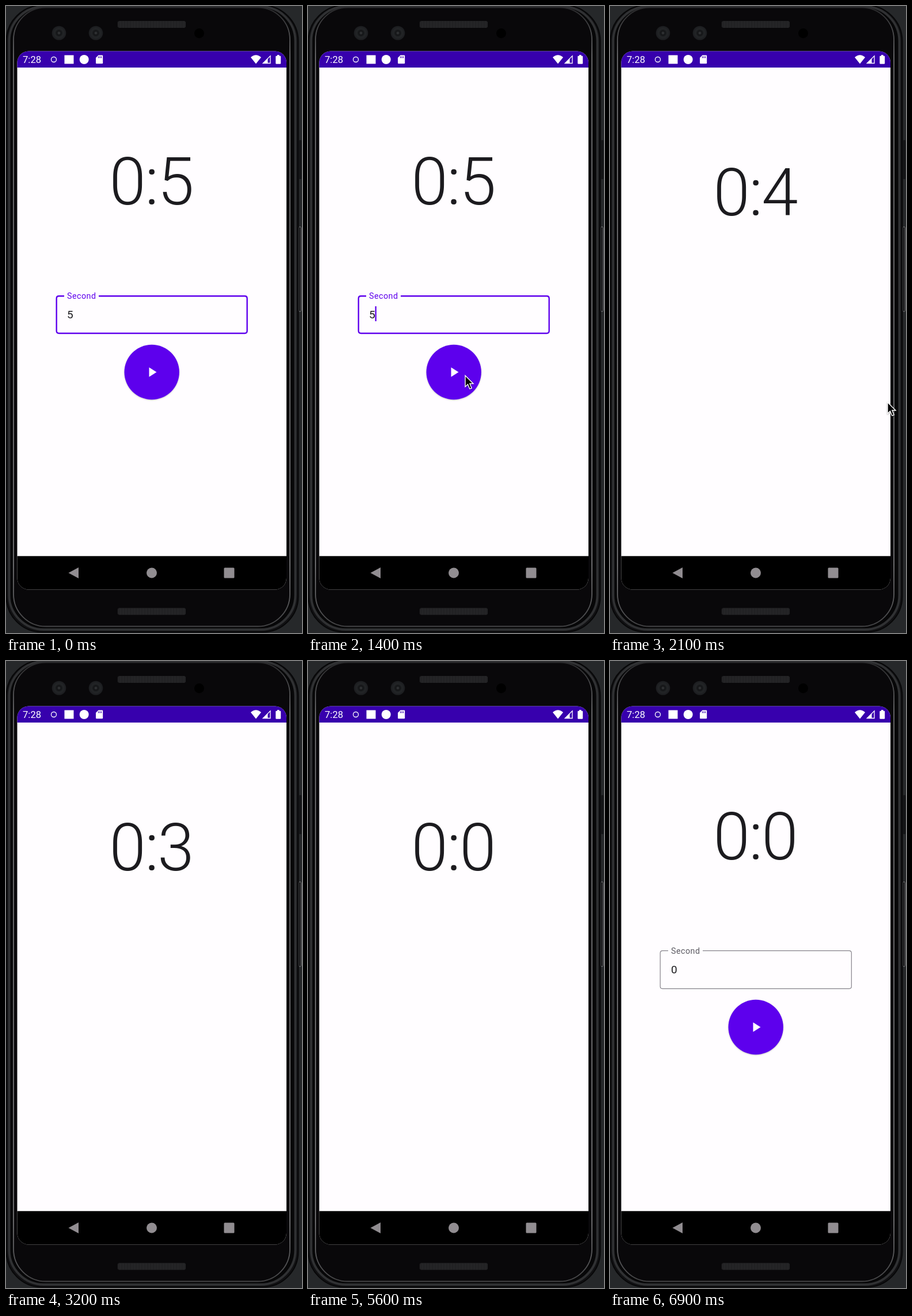
An HTML page for the animation above (7600 ms loop, 514 by 1090 pixels).

```html
<!DOCTYPE html>
<html lang="en">
<head>
<meta charset="utf-8">
<title>Countdown timer</title>
<style>
  html, body { margin: 0; width: 100%; height: 100%; overflow: hidden; background: #26282a; }
  svg { display: block; width: 514px; height: 1090px; }
  text { font-family: Roboto, sans-serif; fill: #1c1b1f; white-space: pre; }
  #timer { font-size: 114.2px; font-weight: 300; letter-spacing: -1.78px; }
  #value { font-size: 19px; letter-spacing: .6px; }
  #label { font-size: 14.27px; letter-spacing: .48px; fill: #5c5a62; }
  #border { fill: none; stroke: #85828a; stroke-width: 1.2; }
  .focus #label { fill: #5f00ed; }
  .focus #border { stroke: #5f00ed; stroke-width: 2.4; }
  #fab circle { fill: #5d00ed; filter: drop-shadow(0 1.2px 1.3px rgba(0, 0, 0, .22)); }
  #pointer { filter: drop-shadow(0 1px 1px rgba(0, 0, 0, .35)); }
  .white { fill: #fff; }
  .nav { fill: #918d91; }
</style>
</head>
<body>
<svg viewBox="0 0 514 1090">
  <defs>
    <linearGradient id="rim" x1="0" y1="0" x2="0" y2="1">
      <stop offset="0" stop-color="#29292b"/>
      <stop offset=".08" stop-color="#6c6c6e"/>
      <stop offset=".9" stop-color="#747476"/>
      <stop offset="1" stop-color="#444446"/>
    </linearGradient>
    <pattern id="mesh" width="2.5" height="12" patternUnits="userSpaceOnUse">
      <rect width="2.5" height="12" fill="#2a2a2c"/>
      <rect width="1" height="12" fill="#18181a"/>
    </pattern>
    <radialGradient id="lens">
      <stop offset="0" stop-color="#3a3c3e"/>
      <stop offset=".3" stop-color="#131416"/>
      <stop offset=".6" stop-color="#232527"/>
      <stop offset="1" stop-color="#1b1c1f"/>
    </radialGradient>
    <clipPath id="screen"><rect x="19.5" y="78.5" width="467.5" height="936" rx="20"/></clipPath>
    <clipPath id="fieldClip"><rect y="480" height="110"/></clipPath>
    <clipPath id="fabClip"><rect y="580" height="120"/></clipPath>
  </defs>

  <!-- phone body -->
  <rect width="514" height="1090" fill="#26282a"/>
  <rect x="509" y="233" width="4" height="68" rx="1.5" fill="#131416"/>
  <rect x="508.5" y="384" width="4" height="147" rx="1.5" fill="#1b1b1d" stroke="#77787a"/>
  <rect x=".5" y="-1" width="507" height="1089.5" rx="62" fill="#111113" stroke="#070708" stroke-width="2"/>
  <rect x="5.5" y="1" width="497" height="1083" rx="60" fill="#070708" stroke="#303133" stroke-width="4"/>
  <rect x="13" y="2.5" width="480" height="1076" rx="56" fill="#09080a" stroke="url(#rim)" stroke-width="1.8"/>
  <rect x="194" y="26" width="118" height="12" rx="3" fill="url(#mesh)"/>
  <rect x="194" y="1046.5" width="118" height="12" rx="3" fill="url(#mesh)"/>
  <circle cx="92" cy="47" r="12.3" fill="url(#lens)"/>
  <circle cx="156" cy="47" r="12.3" fill="url(#lens)"/>
  <circle cx="335.5" cy="47.5" r="8.5" fill="#000"/>

  <g clip-path="url(#screen)">
    <rect x="19" y="78" width="469" height="937" fill="#fffdff"/>
    <rect x="19" y="78" width="469" height="29" fill="#3700ad"/>
    <rect x="19" y="956.3" width="469" height="60" fill="#000"/>
  </g>

  <!-- status bar -->
  <text class="white" x="29" y="99" font-size="16.65">7:28</text>
  <circle cx="83" cy="93" r="4.5" fill="none" stroke="#fff" stroke-width="1.3"/>
  <rect class="white" x="101.5" y="85.5" width="16" height="15"/>
  <circle class="white" cx="135.7" cy="93" r="8"/>
  <path class="white" d="M160.5 85.5H167q1.2 0 1.2 1.2V99q0 1.2-1.2 1.2H157.200q-1.200 0-1.200-1.200V90Z"/>
  <path d="M160.500 87.500v3M163 87.500v3M165.500 87.500v3" stroke="#3700ad" stroke-width="1.200"/>
  <path class="white" d="M434 100.500 425 89.200Q434 81.500 443 89.200Z"/>
  <path d="M459 86.800V99.500H446.300Z" fill="none" stroke="#fff" stroke-width="1.300"/>
  <path class="white" d="M454.500 91V100H445.500Z"/>
  <path class="white" d="M471 85h3.500v1.700H476q1.200 0 1.200 1.200V99.500q0 1.200-1.200 1.200H469.500q-1.200 0-1.200-1.200V87.900q0-1.200 1.200-1.200H471Z"/>

  <!-- navigation bar -->
  <path class="nav" d="M108.500 985.500 126 976V995Z"/>
  <circle class="nav" cx="253" cy="985.500" r="9"/>
  <rect class="nav" x="378.500" y="976.500" width="18" height="18" rx="1.500"/>

  <!-- app -->
  <text id="timer" x="179.600"></text>
  <g clip-path="url(#fieldClip)">
    <g id="field">
      <path id="border"/>
      <text id="label" x="106" y="509">Second</text>
      <text id="value" x="106" y="543"></text>
      <rect id="caret" x="116.500" y="522" width="2.300" height="26" fill="#5f00ed"/>
    </g>
  </g>
  <g clip-path="url(#fabClip)">
    <g id="fab">
      <circle cx="253.200" cy="636.500" r="47.700"/>
      <path class="white" d="M248.500 628.200 261.500 636.500 248.500 644.800Z"/>
    </g>
  </g>
  <path id="pointer" d="M0 0V19.500L4.500 15.300 7.800 23.200 11.200 21.800 7.900 14H14Z" stroke="#fff" stroke-width="1.400"/>
</svg>

<script>
const LOOP = 7600, STEP = 100, MID = 253;
const $ = id => document.getElementById(id);
const show = (el, on) => el.setAttribute('visibility', on ? 'visible' : 'hidden');
const clamp = v => Math.min(1, Math.max(0, v));
const ease = v => v * v * (3 - 2 * v);
const mix = (a, b, k) => a + (b - a) * k;

// remaining distance of a critically damped spring
const spring = ms => {
  const x = Math.max(0, ms) * .02;
  return (1 + x) * Math.exp(-x);
};

// outlined text field with a gap for its label
function outline(l, t, r, b) {
  const q = 4.2;
  return `M161 ${t}H${r - q}Q${r} ${t} ${r} ${t + q}V${b - q}Q${r} ${b} ${r - q} ${b}` +
    `H${l + q}Q${l} ${b} ${l} ${b - q}V${t + q}Q${l} ${t} ${l + q} ${t}H101`;
}

function openness(t) {
  if (t <= 1600) return 1;
  if (t < 2000) return spring(t - 1505);
  if (t < 6600) return 0;
  const p = 1 - spring(t - 6500);
  return p > .99 ? 1 : p;
}

// the window narrows around the middle, its content stays right-aligned
function reveal(name, half, p) {
  const win = document.querySelector(`#${name}Clip rect`);
  win.setAttribute('x', MID - half * p);
  win.setAttribute('width', 2 * half * p);
  $(name).setAttribute('transform', `translate(${half * (p - 1)} 0)`);
}

function pointerAt(t) {
  if (t < 200 || t >= 3200) return null;
  if (t < 1800) {
    const k = ease(clamp((t - 200) / 900));
    return [mix(453, 273, k), mix(680, 642.500, k)];
  }
  if (t < 3100) {
    const k = ease(clamp((t - 1700) / 400));
    return [mix(273, 482, k), mix(642.500, 689, k)];
  }
  return [498, 690];
}

function draw(t) {
  const left = 5 - [1600, 2500, 3600, 4600, 5600].filter(at => t >= at).length;
  const p = openness(t), focus = t < 5600;

  $('timer').textContent = '0:' + left;
  $('timer').setAttribute('y', p ? 345.300 : 364.200);

  $('field').setAttribute('class', focus ? 'focus' : '');
  $('border').setAttribute('d', focus
    ? outline(87.700, 504.200, 418.700, 569)
    : outline(87.200, 503.700, 419.300, 569.600));
  $('value').textContent = focus ? 5 : 0;
  show($('caret'), t < 1600 && (t + 900) % 1000 < 500);
  reveal('field', 167, p);
  reveal('fab', p === 1 ? 52 : 47.700, p);

  const at = pointerAt(t);
  show($('pointer'), at);
  if (at) $('pointer').setAttribute('transform', `translate(${at})`);
}

const start = performance.now();
function tick() {
  const t = (performance.now() - start) % LOOP;
  draw(Math.floor(t / STEP) * STEP);
  requestAnimationFrame(tick);
}
tick();
</script>
</body>
</html>
```
